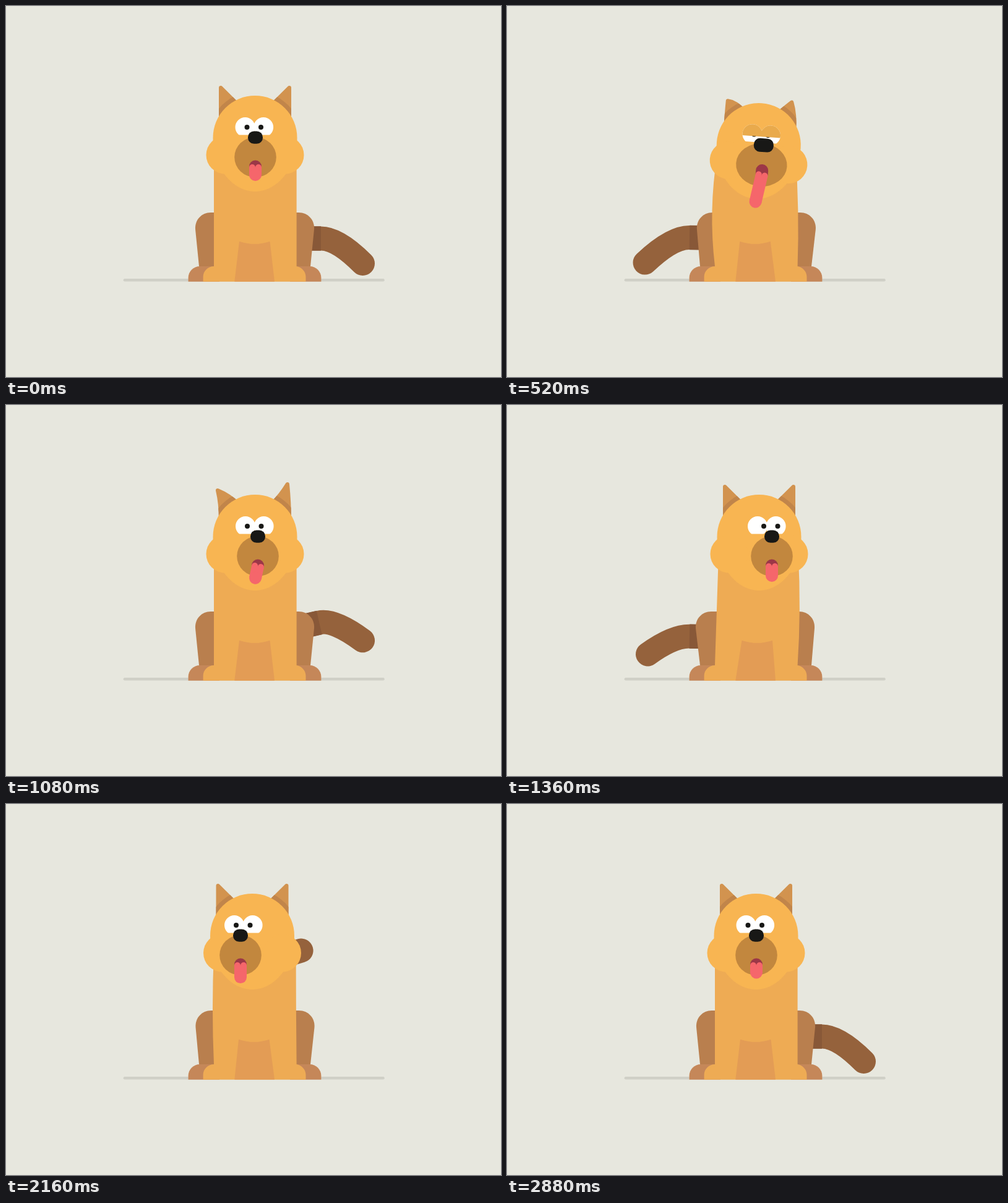
An HTML page with a canvas for the animation above (2920 ms loop, 800 px wide and 600 px high).

```html
<!DOCTYPE html>
<html lang="en">
<head>
<meta charset="utf-8">
<title>Dog</title>
<style>
html, body { margin: 0; width: 100%; height: 100%; overflow: hidden; background: #e7e7de; }
canvas { display: block; }
</style>
</head>
<body>
<canvas id="stage" width="800" height="600"></canvas>
<script>
const ctx = document.getElementById('stage').getContext('2d');
const LOOP = 2920, STEP = 40, WAG = 960;
const DEG = Math.PI / 180;
const C = {
  bg: '#e7e7de', ground: '#d0d0c7', tail: '#95623c', tailShade: '#885838',
  thigh: '#b97f4e', foot: '#c58759', body: '#eeab54', belly: '#e39c55',
  head: '#f8b552', ear: '#d2934f', earShade: '#c1854a', lid: '#e9aa4c',
  muzzle: '#c2873e', nose: '#181816', mouth: '#9c3747', tongue: '#f5666b'
};

// Pose: head place and tilt, face shifts, ear tips, body edges, tongue.
const rest = {
  x: 0, y: 0, rot: 0, face: 0, eyes: 0, pupil: 0, cheek: 0, lid: -17,
  mouthX: 0, open: 0, wide: 0,
  earLx: 0, earLy: 0, earRx: 0, earRy: 0,
  midL: 0, topL: 0, midR: 0, topR: 0, thigh: 0, belly: 0,
  lick: 0, tipX: 0, tipY: 0
};
const pose = p => ({ ...rest, ...p });
const left = pose({
  x: -14.5, y: 12, rot: -14, face: -21.5, eyes: -15, cheek: -6, lid: 3,
  mouthX: -5, open: 6, wide: .22,
  earLx: 15, earLy: 2, earRx: 7.5, earRy: 19,
  midL: 6, midR: 20, topR: -6, thigh: -3, belly: 2.5,
  lick: -31, tipX: -6, tipY: 22
});
const back = pose({
  x: 13, y: 2, rot: 5, face: -15, eyes: -6, cheek: -7, open: 8, wide: .05,
  earLx: 11, earLy: -5, earRx: 5, earRy: 23,
  midL: 7, topL: 2, midR: 11, topR: 10, lick: -5, tipX: 15, tipY: 11
});
const settle = pose({
  face: 4, eyes: .5, earLx: -5, earLy: 6, earRx: -3, earRy: -4, lick: 12
});
const lookR = pose({
  x: 5, face: 19.8, eyes: 13.5, pupil: 7,
  midL: 3, topL: 6, midR: 6, topR: 1, thigh: -1, belly: 2.5
});
const lookL = pose({
  x: -4.5, face: -19.5, eyes: -13,
  midL: -4, midR: -1, topR: -1, thigh: .5, belly: -1
});

function mirror(p) {
  const m = { ...p };
  for (const k in m) if (!['y', 'lid', 'open', 'wide', 'tipY'].includes(k)) m[k] = -p[k];
  return Object.assign(m, {
    earLx: -p.earRx, earLy: p.earRy, earRx: -p.earLx, earRy: p.earLy,
    midL: -p.midR, midR: -p.midL, topL: -p.topR, topR: -p.topL
  });
}

const acts = [
  [0, rest], [320, left], [400, left], [600, mirror(left)], [760, back],
  [1080, settle], [1320, lookR], [1680, lookR], [1960, lookL],
  [2340, lookL], [2620, rest], [LOOP, rest]
];

// time, arm angle, tip along the arm, tip across the arm
const wag = [
  [0, 0, 174.5, 40.5], [120, -13, 169, 44], [240, -82, 148, 55],
  [320, -167.5, 160.5, 50], [400, -179, 174, -30], [480, -181, 180, -43],
  [600, -168, 171, -34], [680, -133.5, 164, -15], [760, -53, 156, -19],
  [840, -13, 166, 20], [880, -2, 172, 37], [WAG, 0, 174.5, 40.5]
];

// Smooth curve through keys that never overshoots them.
function track(keys, t, get) {
  let i = 0;
  while (i < keys.length - 2 && t >= keys[i + 1][0]) i++;
  const val = j => get(keys[j]);
  const secant = j => j < 0 || j > keys.length - 2 ? 0
    : (val(j + 1) - val(j)) / (keys[j + 1][0] - keys[j][0]);
  const slope = j => {
    const a = secant(j - 1), b = secant(j);
    return a * b > 0 ? 2 * a * b / (a + b) : 0;
  };
  const h = keys[i + 1][0] - keys[i][0], u = (t - keys[i][0]) / h;
  const s = u * u * (3 - 2 * u);
  return val(i) * (1 - s) + val(i + 1) * s
    + h * u * (1 - u) * ((1 - u) * slope(i) - u * slope(i + 1));
}

function group(draw) {
  ctx.save();
  draw();
  ctx.restore();
}

function shape(color, draw) {
  ctx.fillStyle = color;
  ctx.beginPath();
  draw();
  ctx.fill();
}

function oval(color, x, y, rx, ry = rx) {
  shape(color, () => ctx.ellipse(x, y, rx, ry, 0, 0, 7));
}

function line(color, width, cap, draw) {
  ctx.strokeStyle = color;
  ctx.lineWidth = width;
  ctx.lineCap = cap;
  ctx.beginPath();
  draw();
  ctx.stroke();
}

function drawTail(t) {
  const [angle, tx, ty] = [1, 2, 3].map(n => track(wag, t % WAG, k => k[n]));
  const arm = 107;
  group(() => {
    ctx.translate(402, 376);
    ctx.rotate(angle * DEG);
    line(C.tail, 39, 'round', () => {
      ctx.moveTo(0, 0);
      ctx.lineTo(arm, 0);
      ctx.quadraticCurveTo(arm + .4 * (tx - arm), 0, tx, ty);
    });
    line(C.tailShade, 39.4, 'butt', () => {
      ctx.moveTo(0, 0);
      ctx.lineTo(arm, 0);
    });
  });
}

function drawHindLeg(shift) {
  shape(C.thigh, () => {
    ctx.moveTo(345, 421);
    ctx.lineTo(312, 421);
    ctx.lineTo(306 + shift, 361);
    ctx.bezierCurveTo(305 + shift, 346, 316 + shift, 334, 331 + shift, 334);
    ctx.lineTo(345, 334);
  });
  shape(C.foot, () => {
    ctx.moveTo(345, 445.7);
    ctx.lineTo(294.6, 445.7);
    ctx.arcTo(294.6, 421, 315, 421, 18.5);
    ctx.lineTo(345, 421);
  });
}

function drawBody(p) {
  drawHindLeg(p.thigh);
  group(() => {
    ctx.translate(804, 0);
    ctx.scale(-1, 1);
    drawHindLeg(-p.thigh);
  });
  shape(C.body, () => {
    ctx.moveTo(336 + p.topL, 240);
    ctx.lineTo(469.6 + p.topR, 240);
    ctx.quadraticCurveTo(469.6 + p.midR, 330, 469.6, 421);
    ctx.bezierCurveTo(478, 422, 484.5, 430, 484.5, 438);
    ctx.lineTo(484.5, 445.7);
    ctx.lineTo(318.6, 445.7);
    ctx.lineTo(318.6, 438);
    ctx.bezierCurveTo(318.6, 429, 326, 421, 336, 421);
    ctx.quadraticCurveTo(336 + p.midL, 330, 336 + p.topL, 240);
  });
  shape(C.belly, () => {
    ctx.moveTo(369.3, 445.7);
    ctx.lineTo(377 + p.belly, 380.7);
    ctx.quadraticCurveTo(402 + p.belly, 389, 426.5 + p.belly, 380.7);
    ctx.lineTo(434, 445.7);
  });
}

// Ear in left-hand coordinates; dx, dy move the tip.
function drawEar(dx, dy) {
  const outline = () => {
    ctx.moveTo(-55.3, -27);
    ctx.quadraticCurveTo(-55.3, -54, -55.3 + dx, -80.8 + dy);
    ctx.quadraticCurveTo(-41.4, -67, -27.5, -53);
    ctx.closePath();
  };
  ctx.lineJoin = 'round';
  shape(C.ear, outline);
  line(C.ear, 6.4, 'round', outline);
  group(() => {
    ctx.beginPath();
    ctx.arc(0, 0, 75, 0, 7);
    ctx.clip();
    shape(C.earShade, outline);
    line(C.earShade, 6.4, 'round', outline);
  });
}

function drawEyes(p) {
  group(() => {
    ctx.translate(-1.2 + p.eyes, -17);
    ctx.beginPath();
    ctx.rect(-40, -20, 80, 32.5);
    ctx.clip();
    ctx.beginPath();
    for (const x of [-14.8, 14.8]) {
      ctx.moveTo(x + 16, 0);
      ctx.arc(x, 0, 16, 0, 7);
    }
    ctx.clip();
    ctx.fillStyle = '#fff';
    ctx.fillRect(-40, -20, 80, 40);
    oval(C.nose, -11.8 + p.pupil, 0, 4);
    oval(C.nose, 10.7 + p.pupil, 0, 4);
    ctx.fillStyle = C.lid;
    if (p.lid > -16) ctx.fillRect(-40, -20, 80, 20 + p.lid);
  });
}

function drawMouth(p, pant) {
  const x = .5 + p.face + p.mouthX;
  line(C.mouth, 20, 'round', () => {
    ctx.moveTo(x, 46.5 - p.open);
    ctx.lineTo(x, 46.6);
  });
  group(() => {
    const len = 11.5 + p.tipY + pant;
    ctx.translate(x, 48);
    ctx.rotate(p.lick * DEG);
    oval(C.tongue, -5, 0, 5);
    oval(C.tongue, 5, 0, 5);
    line(C.tongue, 20, 'butt', () => {
      ctx.moveTo(0, 0);
      ctx.quadraticCurveTo(0, len * .7, p.tipX, len);
    });
    oval(C.tongue, p.tipX, len, 10);
  });
}

function drawHead(p, pant) {
  group(() => {
    ctx.translate(402.5 + p.x, 213 + p.y);
    ctx.rotate(p.rot * DEG);
    drawEar(p.earLx, p.earLy);
    group(() => {
      ctx.scale(-1, 1);
      drawEar(-p.earRx, p.earRy);
    });
    shape(C.head, () => {
      ctx.arc(0, 0, 68, Math.PI, 0);
      ctx.bezierCurveTo(68, 50, 35, 87, 0, 87);
      ctx.bezierCurveTo(-35, 87, -68, 50, -68, 0);
    });
    oval(C.head, -48.5 + p.cheek, 28, 30.5);
    oval(C.head, 48.5 + p.cheek, 28, 30.5);
    drawEyes(p);
    oval(C.muzzle, .5 + p.face, 31.5, 33.8 * (1 + p.wide), 32.5 * (1 + p.wide / 3));
    const w = 12 * (1 + 1.5 * p.wide), h = 10.2 * (1 + p.wide / 3);
    shape(C.nose, () =>
      ctx.roundRect(.5 + p.face + p.mouthX * .8 - w, -.4 - h, w * 2, h * 2, 9.8));
    drawMouth(p, pant);
  });
}

function draw(t) {
  const p = {};
  for (const k in rest) p[k] = track(acts, t, a => a[1][k]);
  const pant = t < 2580 ? 11 * Math.sin((t - 20) / 320 * Math.PI) ** 2 : 0;
  ctx.fillStyle = C.bg;
  ctx.fillRect(0, 0, 800, 600);
  line(C.ground, 4.6, 'round', () => {
    ctx.moveTo(192, 443.3);
    ctx.lineTo(609.5, 443.3);
  });
  drawTail(t);
  drawBody(p);
  drawHead(p, pant);
}

function tick() {
  const t = performance.now() % LOOP;
  draw(Math.floor(t / STEP) * STEP);
  requestAnimationFrame(tick);
}
// Face shifts are measured from the head centre, so looks add the full turn.
Object.assign(lookR, { face: 20, eyes: 13.5 });
tick();
</script>
</body>
</html>
```
